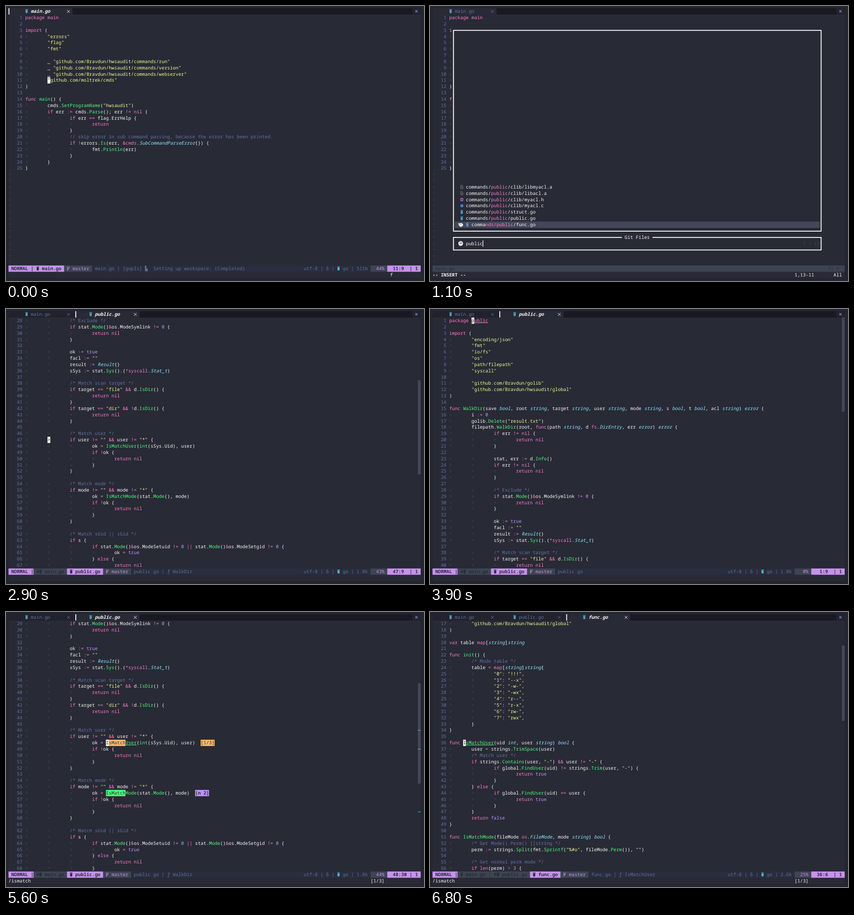
Recreate the animation shown at these times as an HTML page. Size 923 px wide and 607 px high, loop 8000 ms.

```html
<!DOCTYPE html>
<html lang="en">
<head>
<meta charset="utf-8">
<title>Editor session</title>
<style>
html, body { margin: 0; width: 100%; height: 100%; overflow: hidden; background: #232531; }
svg { display: block; width: 923px; height: 607px; }
text { font: 10.25px "Noto Sans Mono", "DejaVu Sans Mono", monospace; white-space: pre; text-rendering: geometricPrecision; }
.b { font-weight: 700; }
.i { font-style: italic; }
</style>
</head>
<body>
<svg id="stage" viewBox="0 0 923 607"></svg>
<script>
const LOOP = 8000, CW = 6.15, RH = 13.85, X0 = 5.5, Y0 = 4.9, COLS = 148;
const C = {
  bg: '#282a36', fg: '#f8f8f2', dim: '#6272a4', faint: '#44475a', fill: '#191a21', menu: '#21222c',
  pink: '#ff79c6', green: '#50fa7b', yellow: '#f1fa8c', cyan: '#8be9fd', violet: '#bd93f9', orange: '#ffb86c',
  bar: '#c792ea', barDark: '#292d3e', barMid: '#3e4452', barText: '#676e95', go: '#519aba'
};

// Each leading ">" stands for one tab.
const mainGo = { first: 1, total: 25, lines: `package main

import (
>"errors"
>"flag"
>"fmt"

>_ "github.com/Bravdun/hwsaudit/commands/run"
>_ "github.com/Bravdun/hwsaudit/commands/version"
>_ "github.com/Bravdun/hwsaudit/commands/webserver"
>"github.com/moltrek/cmds"
)

func main() {
>cmds.SetProgramName("hwsaudit")
>if err := cmds.Parse(); err != nil {
>>if err == flag.ErrHelp {
>>>return
>>}
>>// skip error in sub command parsing, because the error has been printed.
>>if !errors.Is(err, &cmds.SubCommandParseError{}) {
>>>fmt.Println(err)
>>}
>}
}`.split('\n') };

const publicGo = { first: 1, total: 109, lines: `package public

import (
>"encoding/json"
>"fmt"
>"io/fs"
>"os"
>"path/filepath"
>"syscall"

>"github.com/Bravdun/golib"
>"github.com/Bravdun/hwsaudit/global"
)

func WalkDir(save bool, root string, target string, user string, mode string, s bool, t bool, acl string) error {
>i := 0
>golib.Delete("result.txt")
>filepath.WalkDir(root, func(path string, d fs.DirEntry, err error) error {
>>if err != nil {
>>>return nil
>>}

>>stat, err := d.Info()
>>if err != nil {
>>>return nil
>>}

>>/* Exclude */
>>if stat.Mode()&os.ModeSymlink != 0 {
>>>return nil
>>}

>>ok := true
>>facl := ""
>>result := Result{}
>>sSys := stat.Sys().(*syscall.Stat_t)

>>/* Match scan target */
>>if target == "file" && d.IsDir() {
>>>return nil
>>}
>>if target == "dir" && !d.IsDir() {
>>>return nil
>>}

>>/* Match user */
>>if user != "" && user != "*" {
>>>ok = IsMatchUser(int(sSys.Uid), user)
>>>if !ok {
>>>>return nil
>>>}
>>}

>>/* Match mode */
>>if mode != "" && mode != "*" {
>>>ok = IsMatchMode(stat.Mode(), mode)
>>>if !ok {
>>>>return nil
>>>}
>>}

>>/* Match sUid || sGid */
>>if s {
>>>if stat.Mode()&os.ModeSetuid != 0 || stat.Mode()&os.ModeSetgid != 0 {
>>>>ok = true
>>>} else {
>>>>return nil
>>>}
>>}

>>/* Match sticky */
>>if t {
>>>if stat.Mode()&os.ModeSticky != 0 {
>>>>ok = true
>>>} else {
>>>>return nil`.split('\n') };

const funcGo = { first: 17, total: 142, lines: `>"github.com/Bravdun/hwsaudit/global"
)

var table map[string]string

func init() {
>/* Mode table */
>table = map[string]string{
>>"0": "!!!",
>>"1": "--x",
>>"2": "-w-",
>>"3": "-wx",
>>"4": "r--",
>>"5": "r-x",
>>"6": "rw-",
>>"7": "rwx",
>}
}

func IsMatchUser(uid int, user string) bool {
>user = strings.TrimSpace(user)
>/* Match user */
>if strings.Contains(user, "-") && user != "-" {
>>if global.FindUser(uid) != strings.Trim(user, "-") {
>>>return true
>>}
>} else {
>>if global.FindUser(uid) == user {
>>>return true
>>}
>}
>return false
}

func IsMatchMode(fileMode os.FileMode, mode string) bool {
>/* Get Mode().Perm() []string */
>perm := strings.Split(fmt.Sprintf("%#o", fileMode.Perm()), "")

>/* Get normal perm mode */
>if len(perm) > 3 {`.split('\n') };

const PUB = 'commands/public/';
const repoFiles = ['main.go', 'go.sum', 'go.mod', 'global/global.go', 'commands/webserver/webserver.go',
  'commands/version/version.go', 'commands/run/run.go',
  ...['struct.go', 'public.go', 'func.go', 'clib/myacl.h', 'clib/myacl.c', 'clib/libmyacl.a', 'clib/libacl.a'].map(f => PUB + f),
  'README.md', 'LICENSE', '.gitignore'];
const inPublic = (...tail) =>
  ['clib/libmyacl.a', 'clib/libacl.a', 'clib/myacl.h', 'clib/myacl.c', ...tail].map(f => PUB + f);
const byName = inPublic('struct.go', 'public.go', 'func.go');
const byExt = inPublic('struct.go', 'func.go', 'public.go');

// Drawing on the character grid
let out = '';
const px = col => X0 + col * CW, py = row => Y0 + row * RH;
const esc = s => s.replace(/&/g, '&amp;').replace(/</g, '&lt;');
const box = (x, y, w, h, fill) => out += `<rect x="${x}" y="${y}" width="${w}" height="${h}" fill="${fill}"/>`;
const cells = (col, row, n, fill, rows = 1) => box(px(col), py(row), n * CW, rows * RH, fill);
const path = (col, row, d, attrs) =>
  out += `<path transform="translate(${px(col)} ${py(row)})" d="${d}" ${attrs}/>`;

function text(col, row, str, fill, cls = '') {
  out += `<text x="${px(col)}" y="${py(row) + 10.2}" fill="${fill}" class="${cls}">${esc(str)}</text>`;
}
function label(col, row, str, bg, fg = C.bg, cls = '') {
  cells(col, row, str.length, bg);
  text(col, row, str, fg, cls);
}

const goIcon = (col, row, fill) =>
  path(col, row, 'M.3 2.2h5.6v1.3H.3zM.7 4.2h4.8v5q0 1.9-2.4 1.9T.7 9.2z', `fill="${fill}"`);
const branchIcon = (col, row, fill) =>
  path(col, row, 'M1.3 2v9.5M1.3 8.5Q4.6 7.5 4.6 2.5', `fill="none" stroke="${fill}" stroke-width="1.2"`);

function promptIcon(row) {
  path(9, row, 'M1.7 6.8a5.2 5.4 0 1 0 10.4 0a5.2 5.4 0 1 0-10.4 0z', `fill="${C.fg}"`);
  path(9, row, 'M4.2 5.6q2.7 1.8 5.4 0M5 3.2h1M8 3.2h1', `fill="none" stroke="${C.bg}" stroke-width="1.2"`);
}
function caretIcon(row) {
  path(9, row, 'M1.6 3.4l3.4.6 3-1.4 4 2.8v3.4q-2 3-5 2.6T2.8 7.6z', `fill="${C.fg}"`);
  path(9, row, 'M4 5.8l2.6.6M7.4 4.6l1.6 1.6', `stroke="${C.faint}"`);
}
function fileIcon(name, col, row) {
  const ext = name.split('.').pop();
  if (ext === 'go') return goIcon(col, row, C.go);
  if (ext === 'h' || ext === 'c') {
    const round = ext === 'c';
    out += `<rect x="${px(col)}" y="${py(row) + 3.6}" width="6.4" height="6.4" rx="${round ? 3.2 : 1}" fill="${round ? '#599eff' : '#a074c4'}"/>`;
    return path(col, row, round ? 'M4.3 5.7a1.6 1.6 0 1 0 0 2.2' : 'M2 5v3.6M4.4 5v3.6M2 6.8h2.4', `fill="none" stroke="${C.bg}"`);
  }
  path(col, row, 'M.8 3h3.2l1.6 1.8v5.7H.8zM2 6h2.5M2 8h2.5', 'fill="none" stroke="#7d7f88" stroke-width=".9"');
}

// Status line text: "@" is the language icon, "^" the branch icon.
function segment(col, str, bg, fg, cls, iconFill = fg) {
  cells(col, 41, str.length, bg);
  text(col, 41, str.replace(/[@^]/g, ' '), fg, cls);
  [...str].forEach((ch, i) => {
    if (ch === '@') goIcon(col + i, 41, iconFill);
    if (ch === '^') branchIcon(col + i, 41, fg);
  });
  return col + str.length;
}

// Syntax colours
const TYPES = 'string|bool|int|error|Result|Stat_t|DirEntry|FileMode|SubCommandParseError';
const SYNTAX = new RegExp([
  '(?<dim>/\\*.*\\*/|//.*)', '(?<yellow>"[^"]*")',
  `(?<pink>package \\w+|\\b(?:import|func|var|map|len|if|else|return|nil)\\b|\\b\\w+(?=\\.(?:${TYPES})\\b)|:=|[=!<>&|*]+)`,
  `(?<cyan>\\b(?:${TYPES})\\b(?!\\())`, '(?<green>\\b\\w+(?=\\())',
  '(?<violet>\\b(?:\\d+|true|false)\\b)', '(?<fg>\\w+|[^\\s\\w])'].join('|'), 'g');

const expand = line => line.replace(/^>+/, t => '>       '.repeat(t.length));

function codeLine(line, row) {
  const depth = line.match(/^>*/)[0].length;
  for (let d = 0; d < depth; d++) text(6 + 8 * d, row, '>', C.faint);
  for (const m of line.slice(depth).matchAll(SYNTAX)) {
    const kind = Object.keys(m.groups).find(k => m.groups[k] !== undefined);
    text(6 + 8 * depth + m.index, row, m[0], C[kind], kind === 'cyan' ? 'i' : '');
  }
}

function editor({ file, top, pos, find, lens = [], word, wordColor = C.green, command, blurred, bar, marks = [] }) {
  const lineAt = n => file.lines[n - file.first];
  const rowOf = n => n - top + 1;
  const [line, vcol] = pos, cursorCol = 5 + vcol;
  for (let row = 1; row <= 40; row++) {
    const n = top + row - 1, src = lineAt(n);
    if (src === undefined) { text(0, row, '~', C.faint); continue; }
    text(5 - String(n).length, row, String(n), C.dim);
    codeLine(src, row);
    if (word && n === line) box(px(cursorCol), py(row) + 11.3, word.length * CW, 1, wordColor);
    if (!find) continue;
    const shown = expand(src), lower = shown.toLowerCase();
    for (let i = lower.indexOf(find); i >= 0; i = lower.indexOf(find, i + find.length)) {
      const current = n === line && i === vcol - 1;
      label(6 + i, row, shown.substr(i, find.length), current ? C.orange : C.green);
    }
  }
  for (const [n, note, color] of lens)
    label(8 + expand(lineAt(n)).length, rowOf(n), note, color, C.bg, color === C.violet ? 'b' : '');
  if (bar) cells(147, 1 + bar[0], 1, C.faint, bar[1]);
  marks.forEach((r, i) => box(px(147), py(r + 1) + 6.4, CW, 1, i ? C.green : '#5fc4b8'));
  if (!command && !blurred) label(cursorCol, rowOf(line), expand(lineAt(line))[vcol - 1], C.fg);
}

function tabline(tabs, blurred) {
  const last = tabs.length - 1, end = 24 * last + 23;
  cells(0, 0, 24 * last, C.menu);
  tabs.forEach((name, i) => {
    const start = 24 * i, on = !blurred && i === last;
    const nameCol = start + (name.length > 7 ? 7 : 8);
    if (on) box(px(start), py(0), 2, RH, C.fg);
    goIcon(nameCol - 2, 0, C.go);
    text(nameCol, 0, name, on ? C.fg : C.dim, on ? 'b i' : '');
    path(start + 21, 0, 'M.2 4l6 6M6.2 4l-6 6', `stroke="${on ? C.fg : C.dim}"`);
  });
  cells(end, 0, 145 - end, C.fill);
  cells(145, 0, 3, C.menu);
  path(146, 0, 'M.5 4.2l5 5M5.5 4.2l-5 5', `stroke="${C.dim}" stroke-width="2"`);
}

function statusline({ tabs, command, info, size, file, pos }) {
  const others = tabs.slice(0, -1), name = tabs[tabs.length - 1];
  cells(0, 41, COLS, C.barDark);
  let col = segment(0, command ? ' COMMAND |' : ' NORMAL |', C.bar, C.barDark, 'b');
  if (others.length) {
    const list = others.map((n, i) => (i === others.length - 1 ? '#' : '') + '@ ' + n).join(' | ');
    col = segment(col, ` ${list} `, C.barMid, C.barDark, 'b');
  }
  col = segment(col, ` @ ${name} `, C.bar, C.barDark, 'b');
  col = segment(col, ' ^ master ', C.barMid, C.bar, '');
  text(col + 1, 41, name + (info ? ' | ' + info : ''), C.barText);
  segment(106, `utf-8 | δ | @ go | ${size}`, C.barDark, C.barText, '', '#4fb3cf');
  const percent = Math.floor(pos[0] / file.total * 100) + '%';
  segment(130, percent.padStart(5) + ' ', C.barMid, C.bar, '');
  segment(136, `${String(pos[0]).padStart(4)}:${String(pos[1]).padEnd(2)} | 1 `, C.bar, C.barDark, 'b');
}

function completion(typed) {
  cells(0, 39, 26, C.menu, 3);
  ['IsMatchAcl', 'IsMatchUser', 'IsMatchMode'].forEach((item, i) => {
    const row = 39 + i;
    text(1, row, item.slice(0, typed), C.cyan);
    text(1 + typed, row, item.slice(typed), '#d5eef0');
    path(13, row, 'M1 4h5M1 6.2h4M1 8.4h5M1 10.4h4', `stroke="${C.fg}" stroke-width=".9"`);
    text(15, row, 'Text', C.fg);
    text(20, row, '[BUF]', C.dim);
  });
}

function buffer(s) {
  tabline(s.tabs);
  editor(s);
  statusline(s);
  if (s.menu) completion(s.menu);
  if (s.message) text(0, 42, s.message, C.fg);
  if (s.command) cells(s.message.length, 42, 1, C.fg);
  if (s.count) text(130, 42, s.count, C.fg);
  if (s.keys) text(137, 42, s.keys, C.fg);
}

function frame(top, bottom) {
  cells(7, top, 133, C.bg, bottom - top + 1);
  out += `<rect x="${px(7.5) + .2}" y="${py(top + .5) + .4}" width="${132 * CW}" height="${(bottom - top) * RH}" fill="none" stroke="${C.fg}" stroke-width="2"/>`;
}

function picker(query, files) {
  const n = query.length;
  tabline(['main.go'], true);
  editor({ ...mainView, blurred: true });
  cells(0, 41, COLS, C.barMid);
  text(1, 41, 'main.go', C.barDark);
  text(142, 41, '11:9', C.barDark);
  frame(3, 35);
  frame(36, 38);
  label(68, 36, ' Git Files ', C.bg, C.fg);
  files.forEach((file, i) => {
    const row = 35 - files.length + i, chosen = i === files.length - 1, col = chosen ? 14 : 12;
    if (chosen) { cells(8, row, 131, C.faint); caretIcon(row); }
    fileIcon(file, col - 2, row);
    text(col, row, file, C.fg);
    if (!n) return;
    const hit = (from, to) => label(col + from, row, file.slice(from, to), chosen ? C.faint : C.bg, C.pink);
    if (chosen) return n > 6 ? hit(16, 16 + n) : hit(5, 9 + n);
    hit(9, 9 + Math.min(n, 6));
    const dot = file.lastIndexOf('.');
    if (n > 6) hit(dot, dot + n - 6);
  });
  promptIcon(37);
  text(12, 37, query, C.fg);
  box(px(12 + n), py(37), 1.5, RH, C.fg);
  const tally = `${files.length} / 17`;
  text(139 - tally.length, 37, tally, C.faint);
  text(0, 42, '-- INSERT --', C.fg, 'b');
  text(130, 42, `1,${7 + n}-${5 + n}`, C.fg);
  text(144, 42, 'All', C.fg);
}

// Scenes
const mainView = { tabs: ['main.go'], file: mainGo, top: 1, pos: [11, 9], size: '511b', keys: 'f',
  info: '[gopls] ▙  Setting up workspace: (Completed)' };
const publicView = { tabs: ['main.go', 'public.go'], file: publicGo, size: '1.8k', top: 28, pos: [47, 9],
  info: 'ƒ WalkDir', bar: [10, 15] };
const head = { ...publicView, top: 1, pos: [1, 9], info: '', bar: [0, 15], word: 'public', wordColor: C.pink };
const search = (typed, base, extra) =>
  ({ ...base, command: true, message: '/' + typed, find: typed, ...extra });
const firstHit = { ...publicView, top: 29, pos: [48, 30], bar: null, lens: [[39, '[1/5]', C.orange]] };
const found = { ...firstHit, find: 'ismatch', message: '/ismatch', count: '[1/3]', word: 'IsMatchUser',
  bar: [10, 16], marks: [17, 20, 30], lens: [[48, '[1/3]', C.orange], [56, '[n 2]', C.violet]] };
const nextHit = { ...found, top: 37, pos: [56, 30], word: 'IsMatchMode', bar: [13, 16],
  lens: [[48, '[N 1]', C.violet], [56, '[2/3]', C.orange]] };
const funcView = { tabs: ['main.go', 'public.go', 'func.go'], file: funcGo, size: '2.6k', top: 17, pos: [36, 6],
  message: '/ismatch', count: '[1/3]' };

const timeline = [];
const at = (time, draw, ...args) => timeline.push([time, () => draw(...args)]);
at(0, buffer, mainView);
at(300, picker, '', repoFiles);
for (let n = 1; n <= 6; n++) at(500 + 100 * n, picker, 'public'.slice(0, n), byName);
at(1700, picker, 'public.', byExt);
at(1800, picker, 'public.g', byExt.slice(-3));
at(1900, picker, 'public.go', byExt.slice(-3));
at(2900, buffer, publicView);
at(3700, buffer, { ...publicView, keys: 'g' });
at(3900, buffer, head);
at(4200, buffer, search('', head));
at(4400, buffer, search('i', head, { pos: [1, 13], word: '' }));
at(4500, buffer, search('is', head, { pos: [39, 42], word: '', info: 'ƒ WalkDir', lens: firstHit.lens }));
at(4600, buffer, search('ism', firstHit));
[4700, 4800, 4900, 5100, 5200].forEach((t, i) =>
  at(t, buffer, search('ismatch'.slice(0, 3 + i), firstHit, { menu: 3 + i })));
at(5600, buffer, found);
at(6000, buffer, nextHit);
at(6400, buffer, found);
at(6700, buffer, funcView);
at(6800, buffer, { ...funcView, info: 'ƒ IsMatchUser', word: 'IsMatchUser', bar: [4, 12] });

const stage = document.getElementById('stage');
let shown = -1;
function tick() {
  const t = performance.now() % LOOP;
  const step = timeline.findLastIndex(([start]) => start <= t);
  if (step !== shown) {
    shown = step;
    out = '';
    cells(0, 0, COLS, C.bg, 43);
    timeline[step][1]();
    stage.innerHTML = out;
  }
  requestAnimationFrame(tick);
}
tick();
</script>
</body>
</html>
```
